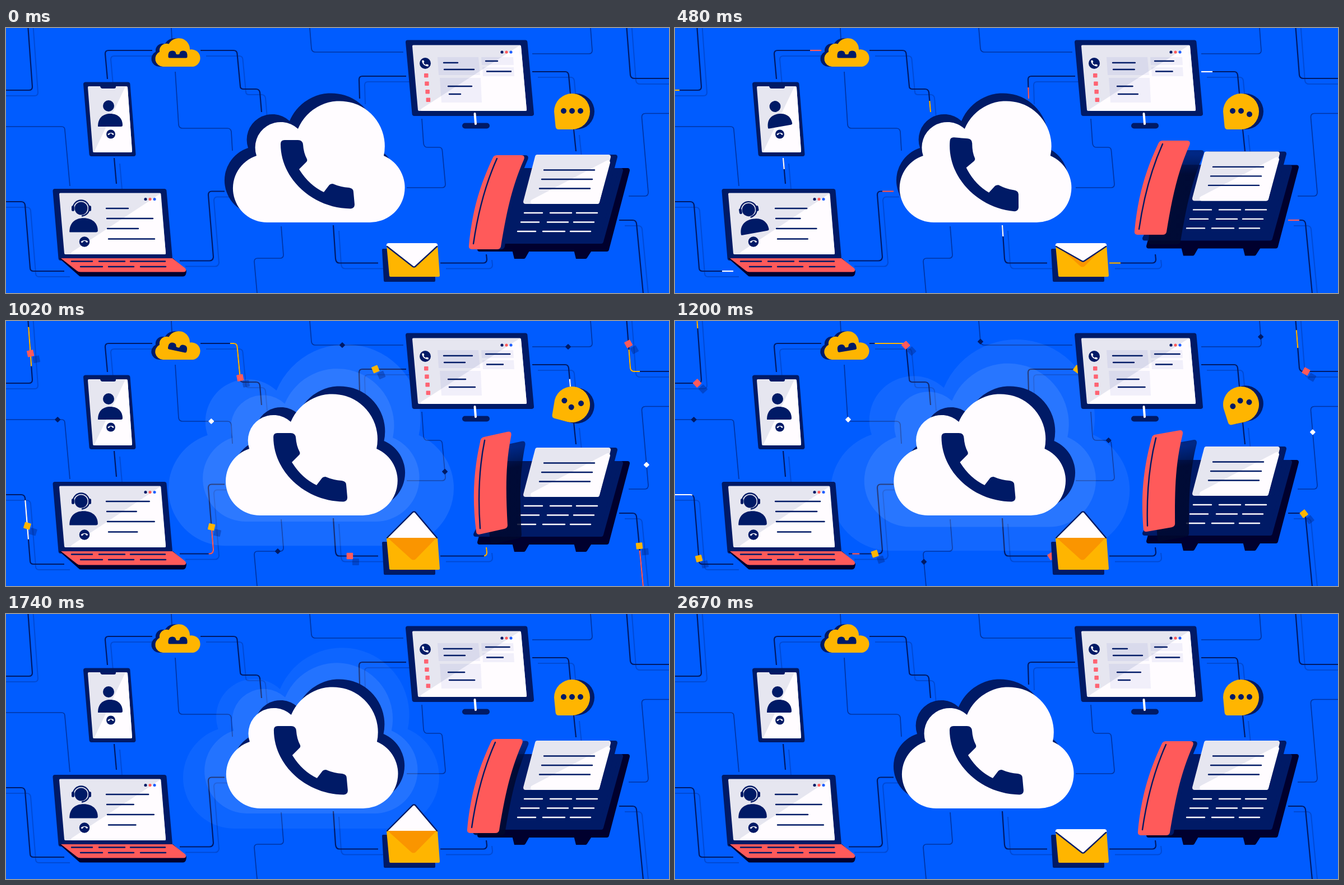
Write an HTML page that moves like this. It is 1183 by 473 pixels and loops after 2.7 s.

```html
<!DOCTYPE html>
<html lang="en">
<head>
<meta charset="utf-8">
<title>Cloud calls</title>
<style>
html, body { margin: 0; height: 100%; overflow: hidden; background: #005cff; }
svg { display: block; width: 100vw; height: 100vh; }
.n { fill: #001a66; stroke: #001a66; }
.k { fill: #00002e; stroke: #00002e; }
.c { fill: #ff5a5a; stroke: #ff5a5a; }
.y { fill: #ffb500; stroke: #ffb500; }
.w { fill: #fffcff; stroke: #fffcff; }
.g { fill: #e6e6f0; stroke: #e6e6f0; }
.b { fill: #1f5fff; stroke: #1f5fff; }
.n, .k, .c, .y, .w, .g, .b { stroke-width: 0; stroke-linejoin: round; }
.r { stroke-width: 8; }
.s { stroke-width: 4; }
.line { fill: none; stroke-width: 2.4; stroke-linecap: round; }
.wire { fill: none; stroke: #001a66; stroke-width: 2.2; }
.thin { stroke-width: 1.7; opacity: .6; }
.soft { stroke-width: 2; opacity: .27; }
</style>
</head>
<body>
<svg viewBox="0 0 1183 473" preserveAspectRatio="none">
<defs>
  <path id="cloud" d="M466 347A61 61 0 0 1 447 228A45.5 45.5 0 0 1 521 180A80.5 80.5 0 0 1 674 228A62 62 0 0 1 649 347Z"/>
  <path id="puff" d="M280 69A14 14 0 0 1 274 42.500A12.500 12.500 0 0 1 290.500 28.500A20 20 0 0 1 328 38.500A15.500 15.500 0 0 1 334 69Z"/>
  <path id="bubble" d="M986 181Q981 181 980.500 175L978 149A32 32 0 1 1 1010 181Z"/>
  <path id="tube" d="M497 200H521Q529 200 530 208Q531 223 537 234Q538 237 536 239L523 252Q540 280 567 293L577 280Q579 278 583 278Q597 284 612 285Q620 286 620 293L622 315Q622 322 615 322.500C548 322 490 270 490 207Q490 200 497 200Z"/>
  <path id="receiver" d="M876 227H919Q927 227 924 235C902 285 893 330 883 390Q882 395 876 395H831Q825 395 826 388C832 325 846 280 868 233Q870 227 876 227Z"/>
  <path id="bust" d="M-22 9C-22-6-13-13.500 0-13.500C14-13.500 22-5 22 7Q22 9.500 19 9.500H-20Q-22 9.500-22 9Z"/>
  <linearGradient id="shade" gradientUnits="userSpaceOnUse" x1="0" y1="235" x2="0" y2="270">
    <stop stop-color="#001a66" stop-opacity=".8"/>
    <stop offset="1" stop-color="#00082d" stop-opacity=".85"/>
  </linearGradient>
</defs>

<g id="wires"></g>
<g fill="#fff" opacity=".92"><use id="ring0" href="#cloud"/><use id="ring1" href="#cloud" opacity=".1"/><use id="ring2" href="#cloud" opacity=".1"/></g>
<g id="dashes"></g>
<g id="squares"></g>

<!-- main cloud -->
<use id="cloudBack" href="#cloud" class="n"/>
<g id="cloudFront"><use href="#cloud" class="w"/><use id="bigTube" href="#tube" class="n"/></g>

<!-- small cloud -->
<use href="#puff" class="n" x="-7"/>
<use href="#puff" class="y"/>
<path id="smallTube" class="n" d="M289.500 47.500Q290 40.500 297 40.500Q303 40.500 303.500 46.500Q306.500 48 309.500 46.500Q310 40.500 316 40.500Q323 40.500 323.500 47.500V51Q323.500 53.500 321 53.500H292Q289.500 53.500 289.500 51Z"/>

<!-- mobile -->
<path class="n r" d="M142 100.500H217.500L227.500 225H152.500Z"/>
<path class="g s" d="M148 106H215L223 220H157Z"/>
<path class="w s" d="M214 107L215 107L223 220H160Z"/>
<path class="n" d="M167 97H197L196 105Q196 108 193 108H172Q169 108 168 104Z"/>
<g id="caller" class="n"><circle cx="183" cy="139" r="10"/><use href="#bust" x="186" y="166.500"/></g>
<circle class="n" cx="187" cy="189.500" r="8"/>
<use href="#tube" class="w" transform="translate(187 189.500) rotate(135) scale(.065) translate(-556 -261)"/>

<!-- laptop -->
<path class="n r" d="M87.500 291H282.500L293 411H97.500Z"/>
<path class="g s" d="M97 296.500H274.500L283 402H106Z"/>
<path class="w s" d="M274 299L283 402H118Z"/>
<path class="k" d="M95 411L130 442Q131 443.500 134 443.500H316Q322 443 322 433L298 411Z"/>
<path class="c" d="M98 411H297L320 429Q323 435 317 435.500H133Q129 435.500 126 433Z"/>
<path class="line" stroke="#001a66" d="M117 416.500H154M166 416.500H212M222 416.500H284M133 426H172M183 426H228M240 426H285"/>
<circle class="n" cx="249" cy="305.500" r="2.600"/><circle class="c" cx="257" cy="305.500" r="2.600"/><circle class="b" cx="265" cy="305.500" r="2.600"/>
<g id="agent" class="n">
  <circle cx="134" cy="322" r="11.500"/>
  <path class="line" stroke="#001a66" d="M119.500 322A14.500 14.500 0 0 1 148.500 322Q148 333 136 335.500"/>
  <rect x="117" y="317" width="5" height="10" rx="2.500"/><rect x="147" y="317" width="5" height="10" rx="2.500"/>
  <use href="#bust" transform="translate(138.500 354) scale(1.150 1.100)"/>
</g>
<circle class="n" cx="140" cy="381.500" r="9.300"/>
<use href="#tube" class="w" transform="translate(140 381.500) rotate(135) scale(.072) translate(-556 -261)"/>

<!-- monitor -->
<path class="n r" d="M717 25.500H926.500L938 153H728.500Z"/>
<path class="g s" d="M727 32.500H917L927 146H737Z"/>
<path class="w s" d="M916 34L917 34L927 146H742Z"/>
<path fill="#001aa0" opacity=".055" d="M770 52H843L846 84H772ZM774 89H847L849 133H777ZM848 52H905L906 66H849ZM850 70H906L907 86H851Z"/>
<circle class="n" cx="885" cy="43" r="2.600"/><circle class="c" cx="893" cy="43" r="2.600"/><circle class="b" cx="901" cy="43" r="2.600"/>
<circle class="n" cx="748" cy="63" r="10"/>
<use href="#tube" class="w" transform="translate(748 63) scale(.088) translate(-556 -261)"/>
<g fill="#ff6473"><rect x="746" y="81" width="7.500" height="7.500" rx="1"/><rect x="747.200" y="95.500" width="7.500" height="7.500" rx="1"/><rect x="748.400" y="110" width="7.500" height="7.500" rx="1"/><rect x="749.600" y="124.500" width="7.500" height="7.500" rx="1"/></g>
<rect class="n" x="814" y="169.500" width="49" height="10" rx="5"/>
<path class="line" stroke="#fffcff" style="stroke-width:4" d="M836.500 153L838 171"/>

<!-- chat -->
<g id="chat">
  <use href="#bubble" class="n" x="8"/>
  <use href="#bubble" class="y"/>
  <g id="dots" class="n"><circle cx="995" cy="148" r="5"/><circle cx="1010" cy="148" r="5"/><circle cx="1025" cy="148" r="5"/></g>
</g>

<!-- envelope -->
<path class="n s" d="M673 396H763L764 451H676Z"/>
<path class="y s" d="M681 387H768L772 442H686Z"/>
<path fill="#fa9500" d="M680 386H769L731 425Q727 428 723 425Z"/>
<path id="flap" class="w"/>
<path id="flapEdge" class="line" stroke="#001a66"/>

<!-- desk phone -->
<g id="desk">
  <path class="k" d="M903 396H935L927 410Q926 412 924 412H907ZM1013 396H1046L1037 410Q1036 412 1034 412H1017Z"/>
  <path class="k r" d="M884 254H1109L1072 395H845Z"/>
  <path class="n r" d="M900 254H1097L1062 381H838Z"/>
  <path class="n r" d="M954 230H1087L1066 310H940Z"/>
  <path class="g r" d="M948 230H1075L1055 310H927Z"/>
  <path class="w r" d="M1074 240L1055 310H940Z"/>
  <path class="line" stroke="#001a66" d="M960 253.500H1050M956 270H1046M952 286.500H1042"/>
  <path class="line" stroke="#fffcff" d="M925 330H957M971 330H1009M1018 330H1055M919 346.500H951M966 346.500H1003M1013 346.500H1049M913 363H945M958 363H997M1007 363H1043"/>
</g>
<use id="receiverShade" href="#receiver"/>
<g id="receiverTop">
  <use href="#receiver" class="c"/>
  <path class="line" stroke="#001a66" d="M876 233C855 280 842 330 834 385"/>
</g>

<path id="rows" class="line" stroke="#001a66"/>
</svg>

<script>
const $ = id => document.getElementById(id);
const RED = '#ff5a5a', GOLD = '#ffb500', WHITE = '#fffcff', NAVY = '#001a66';
const LOOP = 2700, MID = 1020, SPEED = .325;

// d: path; dash: [colour, tail at MID, length]; sq: [colour, distance at MID, runs backwards]
const main = [
  {d: 'M390 291.500H367Q361 291.500 361 298L370 409Q369 415.500 363 415.500H310', dash: [RED, 106, 50], sq: [GOLD, 103]},
  {d: 'M261 40H183Q177 40 177 46L181 91', dash: [RED, 150]},
  {d: 'M456 150L453 115Q452 109 446 109H424Q418 109 418 104L412.500 46Q412 40 406 40H347', dash: [GOLD, 80], sq: [RED, 79]},
  {d: 'M193 232L197 278', dash: [WHITE, 100]},
  {d: 'M-12 111H41Q47 111 47 105L38 -20', dash: [GOLD, 87], sq: [RED, 78, 1]},
  {d: 'M104 434H49Q43 434 43 428L34 316Q33 310 27 310H-20', dash: [WHITE, 103], sq: [GOLD, 107, 1]},
  {d: 'M631 126L630 92Q630 86 636 86H714', dash: [RED, 150], sq: [GOLD, 67]},
  {d: 'M939 78H998Q1003 78 1004 84L1007 117', dash: [WHITE, 88]},
  {d: 'M1203 90H1121Q1115 90 1114 84L1106 -20', dash: [GOLD, 72, 53], sq: [RED, 61, 1]},
  {d: 'M1013 181L1017 220'},
  {d: 'M1094 343H1118Q1124 343 1125 349L1138 485', dash: [RED, 95], sq: [GOLD, 84, 1]},
  {d: 'M584 352L588 412Q589 419.500 595 419.500H664', dash: [WHITE, 150], sq: [RED, 90]},
  {d: 'M775 419.500H852Q858 419 858 413L857 404', dash: [GOLD, 78]}
];
const thin = [
  {d: 'M114 282L105 182Q105 176 99 176H0', sq: [NAVY, 117]},
  {d: 'M404 219L402 185Q401 179 395 179H315Q309 179 308 173L302 78', sq: [WHITE, 73]},
  {d: 'M295 0L296 20'},
  {d: 'M709 43H552Q546 43 545 37L542 0', sq: [NAVY, 109]},
  {d: 'M939 46H1040Q1046 46 1046 40L1043 0', sq: [NAVY, 64]},
  {d: 'M1111 300H1140Q1146 300 1146 293L1134.500 160Q1134 152.500 1141 152.500H1183', sq: [WHITE, 76]},
  {d: 'M491 354L495 405Q495 411 489 411H449Q443 411 443 417L448 473', sq: [NAVY, 65]},
  {d: 'M715 285H778Q784 285 784 279L778.500 219Q778 213 773 213H752Q746 213 745 206L742 162', sq: [NAVY, 83]}
];

function add(parent, tag, attrs) {
  const el = document.createElementNS('http://www.w3.org/2000/svg', tag);
  for (const k in attrs) el.setAttribute(k, attrs[k]);
  return $(parent).appendChild(el);
}
const square = (size, fill, opacity = 1) =>
  add('squares', 'rect', {x: -size / 2, y: -size / 2, width: size, height: size, rx: 1, fill, opacity});

for (const w of main) add('wires', 'path', {class: 'wire soft', d: w.d, transform: 'translate(10 10)'});
for (const w of thin) w.el = add('wires', 'path', {class: 'wire thin', d: w.d});
for (const w of main) {
  w.el = add('wires', 'path', {class: 'wire', d: w.d});
  if (w.dash) w.run = add('dashes', 'path', {class: 'wire', d: w.d, style: 'stroke:' + w.dash[0]});
  if (w.sq) w.shade = square(12, NAVY, .32);
}
const movers = [...thin, ...main].filter(w => w.sq);
for (const w of movers) {
  w.size = w.el.getTotalLength();
  w.box = square(w.shade ? 11.5 : 7.5, w.sq[0]);
}

const set = (id, name, value) => $(id).setAttribute(name, value);
const move = (id, value) => set(id, 'transform', value);
const clamp = x => Math.min(1, Math.max(0, x));
const ease = u => (u = clamp(u)) < .5 ? 2 * u * u : 1 - 2 * (1 - u) ** 2;

// Smooth interpolation through time, value pairs.
function key(t, k) {
  if (t <= k[0]) return k[1];
  for (let i = 2; i < k.length; i += 2) if (t < k[i]) {
    const u = (t - k[i - 2]) / (k[i] - k[i - 2]);
    return k[i - 1] + (k[i + 1] - k[i - 1]) * u * u * (3 - 2 * u);
  }
  return k[k.length - 1];
}
const shake = (t, start, period, cycles) => {
  const u = (t - start) / period;
  return u > 0 && u < cycles ? Math.sin(2 * Math.PI * u) : 0;
};

// Point on a path, continued straight past either end.
function pointAt(w, dist) {
  const at = s => w.el.getPointAtLength(w.sq[2] ? w.size - s : s);
  const s = Math.min(w.size, Math.max(0, dist)), p = at(s);
  if (s === dist) return p;
  const q = at(s ? s - 1 : 1), over = Math.abs(dist - s);
  return {x: p.x + (p.x - q.x) * over, y: p.y + (p.y - q.y) * over};
}

function drawTraffic(t) {
  const u = (t - 480) / (MID - 480);
  for (const w of main) if (w.dash) {
    const [, v, len = 70] = w.dash;
    const tail = u > 0 ? v * u * u : 0;
    const head = u > 0 ? 20 + (v + len - 20) * u : 20 * clamp((t - 400) / 80);
    const on = head > tail && t < 1440;
    w.run.setAttribute('stroke-dasharray', `0 ${tail} ${Math.max(0, head - tail)} 9999`);
    w.run.style.display = on ? '' : 'none';
  }
  for (const w of movers) {
    const dist = w.sq[1] + (t - MID) * SPEED;
    const on = dist > -25 && dist < w.size + 35;
    const p = pointAt(w, dist);
    for (const [el, off] of [[w.box, 0], [w.shade, 10.5]]) if (el) {
      el.style.display = on ? '' : 'none';
      el.setAttribute('transform', `translate(${p.x + off} ${p.y + off}) rotate(${w.shade ? dist : 45})`);
    }
  }
}

function drawClouds(t) {
  const x = 7.5 * Math.cos(2 * Math.PI * t / LOOP) - 7.5;
  move('cloudFront', `translate(${x} 0)`);
  move('cloudBack', `translate(${-15 - 1.2 * x} -14)`);
  move('bigTube', `rotate(${5 * shake(t, 90, 300, 3)} 556 261)`);
  const scales = [
    [600, .8, MID, 1.66, 1380, 1.82, 1740, 1.49, 2220, 1.22, 2600, .9],
    [780, .8, MID, 1.26, 1400, 1.45, 1740, 1.24, 2150, .8],
    [1150, .8, 1420, 1.14, 1700, .8]
  ];
  scales.forEach((k, i) => move('ring' + i, `translate(544 222) scale(${key(t, k)}) translate(-558 -239)`));
  set('ring0', 'opacity', key(t, [MID, .1, 1440, .05, 1740, .06, 2220, .035, 2600, 0]));
  move('smallTube', `rotate(${12 * shake(t, 645, 300, 2.5)} 306 47)`);
}

function drawPeople(t) {
  const tilt = -10.5 * shake(t, 90, 300, 3);
  move('caller', `rotate(${tilt} 187 165)`);
  move('agent', `translate(${-tilt * .2} ${-tilt * .1}) rotate(${tilt} 141 350)`);
  move('chat', `rotate(${15 * shake(t, 645, 300, 2.5)} 1010 149)`);
  [700, 595, 395].forEach((start, i) => $('dots').children[i].setAttribute('cy', 148 + 6 * shake(t, start, 340, 2)));
}

function drawEnvelope(t) {
  const y = 427 - 87 * (ease((t - 360) / 500) - ease((t - 1840) / 490));
  const closed = y > 386, base = closed ? 390 : 387;
  const top = closed ? 'Q678 384 683 384H766Q771 384 770 390' : 'H770';
  set('flap', 'd', `M679 ${base}${top}L728 ${y}Z`);
  set('flapEdge', 'd', `M680 ${base}L726 ${y + (closed ? -1 : 1)}Q728 ${y} 730 ${y + (closed ? -1 : 1)}L769 ${base}`);
}

function drawDesk(t) {
  const hop = t > 12 && t < 1692 ? -9 * Math.abs(Math.sin(Math.PI * (t - 12) / 168)) : 0;
  move('desk', `translate(0 ${hop})`);
  const x = key(t, [60, 0, 480, -6, MID, -5, 1440, -3.5, 1740, -3, 1860, 0]);
  const y = key(t, [60, 0, 480, -26, MID, -22, 1440, -31, 1740, -4, 1860, 0]);
  const turn = key(t, [480, 0, MID, -12.5, 1440, -6, 1740, 0]);
  const lift = key(t, [60, 0, 480, 1, 1440, 1, 1740, .2, 1860, 0]);
  const spin = `rotate(${turn} 876 311)`;
  move('receiverTop', `translate(${x} ${y}) ${spin}`);
  move('receiverShade', `translate(${x + 7 + 18 * lift} ${y + 17 * lift}) ${spin}`);
  set('receiverShade', 'fill', lift ? 'url(#shade)' : NAVY);
}

function drawRows(t) {
  const a = 2 * Math.PI * t / LOOP, s = Math.sin(a / 2), c = Math.cos(2 * a), near = Math.min(1, 1.8 * s);
  const rows = [
    [179, 322, 218 + 42 * s ** 1.4], [180, 340, 222 + 40 * ((1 + c) / 2) ** 2],
    [181, 358, 236 + 31 * s], [183, 376.5, 241 + 10 * Math.cos(a) + 14 * c],
    [781, 62, 806 + 28 * s], [782, 74, 835 - 16 * near],
    [856, 59, 877 + 24 * s], [858, 77.5, 901 - 14 * near],
    [789, 104, 816 + 15 * ((1 + c) / 2) ** 2], [791, 118, 811 + 28 * s]
  ];
  set('rows', 'd', rows.map(([x, y, end]) => `M${x} ${y}H${end}`).join(''));
}

function frame() {
  const t = Math.floor(performance.now() % LOOP / 30) * 30;
  for (const draw of [drawTraffic, drawClouds, drawPeople, drawEnvelope, drawDesk, drawRows]) draw(t);
  requestAnimationFrame(frame);
}
frame();
</script>
</body>
</html>
```
